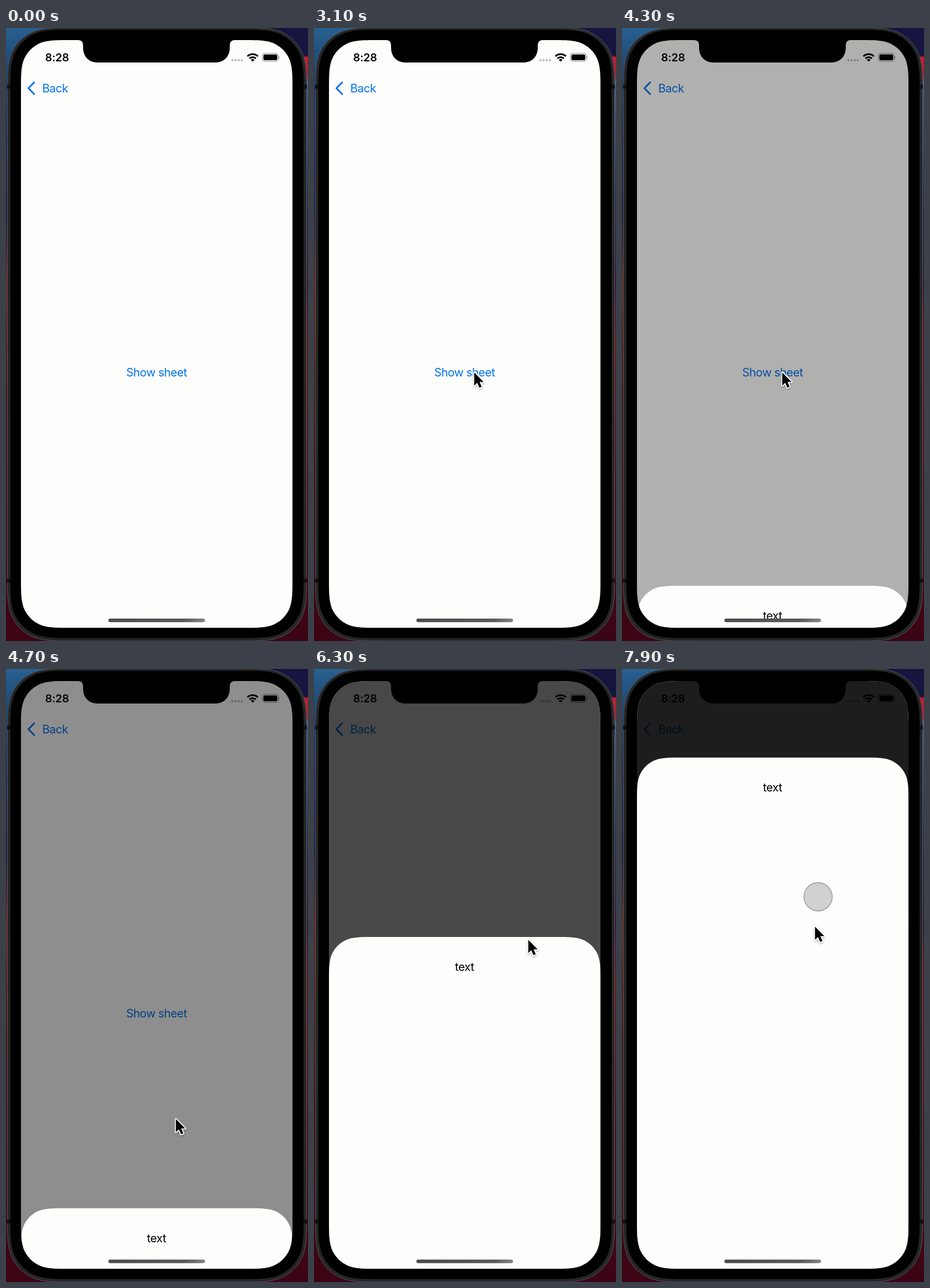
An HTML page for the animation above (8 s loop, 525 by 1066 pixels).

```html
<!DOCTYPE html>
<html lang="en">
<head>
<meta charset="utf-8">
<title>Bottom sheet</title>
<style>
  html, body { margin: 0; width: 100%; height: 100%; overflow: hidden; background: #000; }
  svg { display: block; width: 525px; height: 1066px; }
  text { font: 20px Inter, "Open Sans", sans-serif; letter-spacing: -.5px; }
  .mid { text-anchor: middle; }
  .link { fill: #0471ec; }
  .clock { font-weight: 600; font-size: 19px; letter-spacing: -.2px; }
  .line { fill: none; stroke-linecap: round; stroke-linejoin: round; }
</style>
</head>
<body>
<svg viewBox="0 0 525 1066">
  <defs>
    <linearGradient id="left" x2="0" y2="1">
      <stop offset="0" stop-color="#28608f"/>
      <stop offset=".09" stop-color="#1c3c68"/>
      <stop offset=".3" stop-color="#221c48"/>
      <stop offset=".42" stop-color="#6a2818"/>
      <stop offset=".6" stop-color="#4a1512"/>
      <stop offset="1" stop-color="#3c0414"/>
    </linearGradient>
    <linearGradient id="right" x2="0" y2="1">
      <stop offset="0" stop-color="#15153f"/>
      <stop offset=".045" stop-color="#15153f"/>
      <stop offset=".048" stop-color="#c41f30"/>
      <stop offset=".08" stop-color="#a02038"/>
      <stop offset=".085" stop-color="#49617f"/>
      <stop offset=".25" stop-color="#263a5c"/>
      <stop offset=".42" stop-color="#33183c"/>
      <stop offset=".5" stop-color="#701520"/>
      <stop offset="1" stop-color="#3a0414"/>
    </linearGradient>
    <linearGradient id="bar">
      <stop offset="0" stop-color="#4c4c4c"/>
      <stop offset=".8" stop-color="#5a5a5a"/>
      <stop offset="1" stop-color="#85857e"/>
    </linearGradient>
    <filter id="shade" x="-50%" y="-50%" width="200%" height="200%">
      <feDropShadow dx="0" dy="1.5" stdDeviation="1.5" flood-opacity=".35"/>
    </filter>
    <clipPath id="screenClip"><path id="screenEdge"/></clipPath>
  </defs>

  <rect width="263" height="1066" fill="url(#left)"/>
  <rect x="263" width="262" height="1066" fill="url(#right)"/>
  <path id="shell" fill="#252627" stroke="#56575a"/>
  <path d="M2 102H8M517 102H523M2 961H8M517 961H523" stroke="#111" stroke-width="7"/>
  <path id="bezel"/>

  <g clip-path="url(#screenClip)">
    <rect x="26" y="21" width="472" height="1022" fill="#fdfdfc"/>
    <text class="clock" x="68" y="58">8:28</text>
    <g fill="#b9b9b9">
      <circle cx="393.5" cy="56" r="2"/><circle cx="399" cy="56" r="2"/>
      <circle cx="404.5" cy="56" r="2"/><circle cx="410" cy="56" r="2"/>
    </g>
    <g fill="none" stroke="#000" stroke-width="3">
      <path d="M419.7 49.3a13 13 0 0 1 18.2 0"/>
      <path d="M423.2 53a8 8 0 0 1 11.2 0"/>
    </g>
    <path d="M425.6 55.4a4.6 4.6 0 0 1 6.4 0L428.8 58.6Z"/>
    <rect x="445.6" y="44.1" width="27.8" height="13.8" rx="4.2" fill="none" stroke="#999" stroke-width="1.2"/>
    <rect x="447.5" y="46" width="24" height="10" rx="2.6"/>
    <path d="M474.6 48.8q2.2 2.2 0 4.6Z" fill="#888"/>
    <path class="line" d="M49 94.5L39 104.7L49 115" stroke="#0471ec" stroke-width="2.8"/>
    <text class="link" x="63" y="112">Back</text>
    <text class="link mid" x="261.7" y="605.5">Show sheet</text>
    <rect id="dim" x="26" y="21" width="472" height="1022"/>
    <g id="sheet">
      <path id="card" fill="#fdfdfc"/>
      <text class="mid" x="261.7" y="59">text</text>
    </g>
    <rect x="178" y="1027" width="168" height="6.2" rx="3.1" fill="url(#bar)"/>
    <path d="M126 20V21Q134 21.5 134 30V34C134 50 144 60 160 60H363C379 60 389 50 389 34V30Q389 21.5 397 21V20Z"/>
  </g>

  <circle id="touch" r="24.6" fill="#c8c8c8" fill-opacity=".82" stroke="#85858f" stroke-opacity=".8" stroke-width="1.4"/>
  <g id="cursor" filter="url(#shade)">
    <path d="M0 0V23L5.2 18L9 26.6L13 24.9L9.3 16.5H16.3Z" stroke="#fff" stroke-width="3.4" paint-order="stroke" stroke-linejoin="round"/>
  </g>
</svg>
<script>
const LOOP = 8000, STEP = 100;
const REST = 935, BOTTOM = 1043;
const $ = id => document.getElementById(id);

// Rounded rectangle with continuous-curvature corners
function smoothRect(x, y, w, h, r) {
  const near = [[1.5287, 0], [1.0885, 0], [.8684, 0], [.6315, .0749], [.3728, .1691]];
  const corner = near.concat(near.map(([a, b]) => [b, a]).reverse());
  const sides = [[1, 0, 0], [1, 1, 1], [0, 1, 0], [0, 0, 1]];
  const path = sides.map(([right, low, flip], i) => {
    const pts = corner.map(p => {
      const [a, b] = flip ? [p[1], p[0]] : p;
      const px = right ? x + w - a * r : x + a * r;
      const py = low ? y + h - b * r : y + b * r;
      return px.toFixed(2) + " " + py.toFixed(2);
    });
    return (i ? "L" : "M") + pts[0] + "C" + pts.slice(1).join(" ");
  });
  return path.join("") + "Z";
}

$("shell").setAttribute("d", smoothRect(2.5, -.5, 520, 1066.5, 76));
$("bezel").setAttribute("d", smoothRect(7.5, 3, 510, 1058, 73));
$("screenEdge").setAttribute("d", smoothRect(26, 21, 472, 1022, 57));
$("card").setAttribute("d", smoothRect(26, 0, 472, 1200, 52));

// Keys are [time, ...values]; each segment eases unless its end key is in a drag
const cursorKeys = [
  [700, 420, 1090], [1300, 286, 638], [2600, 278.5, 599], [4300, 278.5, 599],
  [5100, 312, 966], [5600, 312, 966], [5700, 312, 945], [5800, 313, 917],
  [6300, 372.5, 471], [6900, 372.5, 471], [7500, 346, 322], [7700, 346, 325],
  [7800, 345, 357], [7900, 335.5, 448]
];
const sheetKeys = [
  [4100, 1043], [4300, 970], [4400, 953], [4500, 943], [4800, REST], [5800, REST],
  [5900, 850], [6300, 466], [6400, 330], [6500, 230], [6600, 175], [6700, 154]
];
const presses = [[3900, 4100], [5500, 6300], [7700, 8000]];

const smooth = u => u * u * (3 - 2 * u);
const linear = u => u;
const pressed = t => presses.some(([a, b]) => t >= a && t < b);

function sample(keys, t, easeAt) {
  const i = keys.findIndex(k => k[0] > t);
  if (i === 0) return keys[0].slice(1);
  if (i < 0) return keys[keys.length - 1].slice(1);
  const a = keys[i - 1], b = keys[i];
  const u = easeAt(b[0])((t - a[0]) / (b[0] - a[0]));
  return a.slice(1).map((v, n) => v + (b[n + 1] - v) * u);
}

const cursorAt = t => sample(cursorKeys, t, end => pressed(end - 1) ? linear : smooth);
const dimFor = y => y > REST
  ? .45 * (BOTTOM - y) / (BOTTOM - REST)
  : .45 + (REST - y) * .00056;

function place(el, x, y) {
  el.setAttribute("transform", `translate(${x} ${y})`);
}

function draw(t) {
  const [top] = sample(sheetKeys, t, () => linear);
  place($("sheet"), 0, top);
  $("dim").setAttribute("opacity", dimFor(top));
  place($("cursor"), ...cursorAt(t));
  // The touch mark trails the pointer slightly
  place($("touch"), ...cursorAt(t - 57));
  $("touch").style.display = pressed(t) ? "" : "none";
  $("cursor").style.display = t >= 800 ? "" : "none";
}

const start = performance.now();
function frame(now) {
  const t = Math.max(0, now - start) % LOOP;
  draw(Math.floor(t / STEP) * STEP);
  requestAnimationFrame(frame);
}
draw(0);
requestAnimationFrame(frame);
</script>
</body>
</html>
```
